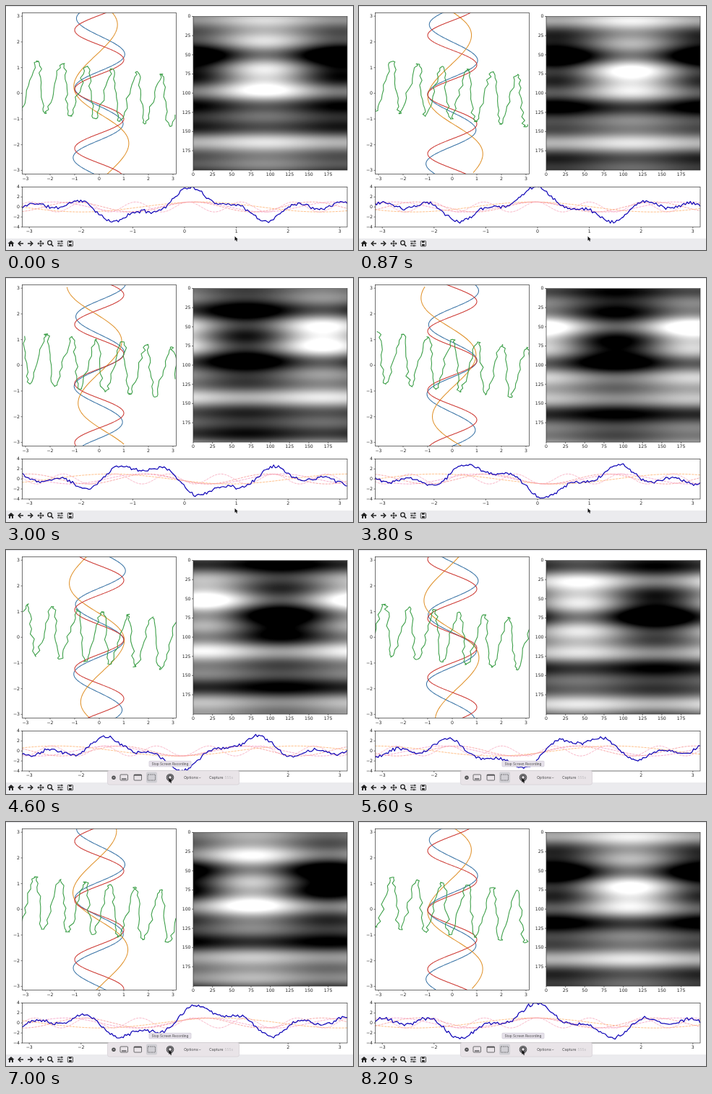
An HTML page with a canvas that plays this animation: 480x339 px, repeating every 8.27 s.

```html
<!DOCTYPE html>
<html lang="en">
<head>
<meta charset="utf-8">
<title>Rotating waves</title>
<style>
html, body { margin: 0; width: 100%; height: 100%; overflow: hidden; background: #fff; }
canvas { display: block; width: 480px; height: 339px; }
</style>
</head>
<body>
<canvas id="stage" width="480" height="339"></canvas>
<script>
const ctx = document.getElementById('stage').getContext('2d');
const LOOP = 8270, STEP = 66.68, POINTS = 200;
const FONT = '"DejaVu Sans", Verdana, sans-serif';
const UI_FONT = 'Inter, Roboto, sans-serif';

// Each plot maps data to pixels: px = ox + x * sx, py = oy - y * sy
const main = { l: 22.5, t: 9.5, r: 235.5, b: 233.5, ox: 129, oy: 121.3, sx: 34, sy: 35.7 };
const strip = { l: 22.5, t: 251.5, r: 472, b: 307, ox: 247, oy: 279.2, sx: 71.6, sy: 6.95 };
const heat = { l: 259, t: 14.5, r: 472, b: 228, ox: 259, oy: 14.5, sx: 1.066, sy: -1.066 };

const waves = [
  { k: 2.32, tilt: -0.025, color: '#3a74a6' },
  { k: 1.36, tilt: 0.1, color: '#e0922c' },
  { k: 2.73, tilt: 0, color: '#cd3a34' }
];
const FAST = 6.19;
const dashes = [[2.32, '#f59fc4'], [1.36, '#ffb473'], [2.73, '#f79a9a'], [FAST, '#f7a9bd']];

// The speed varies a little: [seconds, phase]
const pace = [[0, -0.43], [0.87, 0.13], [3, 1.94], [4.6, 3.37], [5.6, 4.28], [7, 5.34], [8.27, 6.41]];

const heatBuf = document.createElement('canvas');
heatBuf.width = heatBuf.height = 200;
const heatCtx = heatBuf.getContext('2d');
const heatImg = heatCtx.createImageData(200, 200);

function phaseAt(sec) {
  const i = Math.max(1, pace.findIndex(([t]) => t >= sec));
  const [t0, p0] = pace[i - 1], [t1, p1] = pace[i];
  return p0 + (p1 - p0) * (sec - t0) / (t1 - t0);
}

function random(seed) {
  let s = seed >>> 0;
  return () => {
    s = (s + 0x6D2B79F5) >>> 0;
    let v = Math.imul(s ^ (s >>> 15), 1 | s);
    v = (v + Math.imul(v ^ (v >>> 7), 61 | v)) ^ v;
    return ((v ^ (v >>> 14)) >>> 0) / 4294967296;
  };
}

function curve(p, at, color, width, dash = []) {
  ctx.save();
  ctx.beginPath();
  ctx.rect(p.l, p.t, p.r - p.l, p.b - p.t);
  ctx.clip();
  ctx.beginPath();
  for (let i = 0; i < POINTS; i++) {
    const u = -Math.PI + 2 * Math.PI * i / (POINTS - 1);
    const [x, y] = at(u, i);
    ctx.lineTo(p.ox + x * p.sx, p.oy - y * p.sy);
  }
  ctx.strokeStyle = color;
  ctx.lineWidth = width;
  ctx.lineJoin = 'round';
  ctx.setLineDash(dash);
  ctx.stroke();
  ctx.restore();
}

function text(str, x, y, size, align, color = '#222', font = FONT) {
  ctx.font = size + 'px ' + font;
  ctx.textAlign = align;
  ctx.textBaseline = 'middle';
  ctx.fillStyle = color;
  ctx.fillText(str, x, y);
}

function line(points, color = '#222', width = 1) {
  ctx.beginPath();
  points.forEach(([x, y]) => ctx.lineTo(x, y));
  ctx.strokeStyle = color;
  ctx.lineWidth = width;
  ctx.stroke();
}

function box(x, y, w, h, r, fill, stroke) {
  ctx.beginPath();
  ctx.roundRect(x, y, w, h, r);
  if (fill) { ctx.fillStyle = fill; ctx.fill(); }
  if (stroke) { ctx.strokeStyle = stroke; ctx.lineWidth = 0.8; ctx.stroke(); }
}

function disc(x, y, r, fill) {
  ctx.beginPath();
  ctx.arc(x, y, r, 0, 7);
  ctx.fillStyle = fill;
  ctx.fill();
}

function shape(points, fill) {
  ctx.beginPath();
  points.forEach(([x, y]) => ctx.lineTo(x, y));
  ctx.closePath();
  ctx.fillStyle = fill;
  ctx.fill();
}

function axes(p, xs, ys) {
  ctx.strokeStyle = '#333';
  ctx.lineWidth = 0.7;
  ctx.strokeRect(p.l, p.t, p.r - p.l, p.b - p.t);
  const label = v => String(v).replace('-', '\u2212');
  for (const v of xs) {
    const x = p.ox + v * p.sx;
    line([[x, p.b], [x, p.b + 2]], '#222', 0.6);
    text(label(v), x, p.b + 6.6, 6.2, 'center');
  }
  for (const v of ys) {
    const y = p.oy - v * p.sy;
    line([[p.l - 2, y], [p.l, y]], '#222', 0.6);
    text(label(v), p.l - 3.5, y + 0.3, 6.2, 'right');
  }
}

// Horizontal bands plus a vertical band that is strongest in the upper part
function drawHeat(phase) {
  const data = heatImg.data;
  const cols = Array.from({ length: 200 }, (_, c) => Math.cos((c - 106) / 31.8 - phase));
  for (let r = 0; r < 200; r++) {
    const slow = Math.cos(2 * Math.PI * (r - 83) / 77 + phase - 0.2);
    const fast = Math.cos(FAST * (r - 100) / 31.8 - phase);
    const row = 0.42 + 0.25 * slow + 0.15 * fast;
    const gain = 0.1 + 0.36 * Math.exp(-(((r - 65) / 43) ** 2));
    for (let c = 0; c < 200; c++) {
      const o = (r * 200 + c) * 4;
      data[o] = data[o + 1] = data[o + 2] = 255 * (row + gain * cols[c]);
      data[o + 3] = 255;
    }
  }
  heatCtx.putImageData(heatImg, 0, 0);
  ctx.drawImage(heatBuf, heat.l, heat.t, heat.r - heat.l, heat.b - heat.t);
}

function arrowIcon(x, y, dir) {
  line([[x - 3.5 * dir, y], [x + 3 * dir, y]], '#222', 1.5);
  line([[x, y - 3.3], [x + 3.3 * dir, y], [x, y + 3.3]], '#222', 1.5);
}

function toolbar() {
  ctx.fillStyle = '#ebebee';
  ctx.fillRect(0, 323, 480, 16);
  const y = 330;
  shape([[2.5, y], [7, y - 4], [11.5, y], [10, y], [10, y + 4], [8, y + 4],
    [8, y + 1], [6, y + 1], [6, y + 4], [4, y + 4], [4, y]], '#222');
  arrowIcon(20.5, y, -1);
  arrowIcon(33.5, y, 1);
  line([[44, y], [52, y]], '#222', 1);
  line([[48, y - 4], [48, y + 4]], '#222', 1);
  for (const [a, b] of [[1, 0], [-1, 0], [0, 1], [0, -1]]) {
    shape([[48 + a * 4.6, y + b * 4.6], [48 + a * 2.6 + b * 2, y + b * 2.6 + a * 2],
      [48 + a * 2.6 - b * 2, y + b * 2.6 - a * 2]], '#222');
  }
  ctx.beginPath();
  ctx.arc(60.5, y - 1, 2.8, 0, 7);
  ctx.lineWidth = 1.3;
  ctx.stroke();
  line([[62.5, y + 1], [65.3, y + 4]], '#222', 1.6);
  [[-3, 2], [0, -2], [3, 1]].forEach(([dy, dx]) => {
    line([[71, y + dy], [79, y + dy]], '#222', 0.9);
    line([[75 + dx, y + dy - 1.3], [75 + dx, y + dy + 1.3]], '#222', 1.3);
  });
  box(85.3, y - 3.6, 7.2, 7.4, 0.8, null, '#222');
  ctx.fillStyle = '#222';
  ctx.fillRect(87, y - 3.2, 3.6, 2);
  ctx.fillRect(87, y + 0.8, 3.8, 2.4);
}

function recorder(tip) {
  const panel = '#e9e4e8', ink = '#4a4a4c';
  box(140.5, 306.5, 182, 19.5, 2.5, panel, '#d6d1d6');
  disc(149, 316.3, 2.7, ink);
  line([[148, 315.3], [150, 317.3]], panel, 0.6);
  line([[150, 315.3], [148, 317.3]], panel, 0.6);
  box(194, 308.5, 15, 15, 2, '#d0cfd4');
  box(158, 312, 10.5, 8, 1, null, ink);
  line([[160, 318], [166.5, 318]], ink, 1.3);
  box(177, 312, 10.5, 8, 1, null, ink);
  line([[177, 312.8], [187.5, 312.8]], ink, 1.5);
  ctx.setLineDash([1.5, 1]);
  box(196, 312, 10.5, 8, 0.5, null, ink);
  ctx.setLineDash([]);
  disc(227, 316, 5.3, ink);
  disc(227, 316, 4.3, '#d0cfd4');
  disc(227, 316, 3.7, ink);
  ctx.fillStyle = panel;
  ctx.fillRect(225.4, 314.3, 3.2, 3.2);
  text('Options', 246, 316.5, 5.4, 'left', ink, UI_FONT);
  line([[267, 315.8], [268.2, 317], [269.4, 315.8]], '#666', 0.6);
  text('Capture', 281, 316.5, 5.2, 'left', ink, UI_FONT);
  text('555s', 302.5, 316.5, 5, 'left', '#bfbcc0', UI_FONT);
  if (tip) {
    box(198, 293.3, 58, 7.6, 1, '#e6e1ea', '#d2cdd8');
    text('Stop Screen Recording', 227, 297.3, 4.7, 'center', '#444', UI_FONT);
  }
}

function pointer(x, y) {
  shape([[x, y], [x, y + 6], [x + 1.4, y + 4.8], [x + 2.4, y + 7],
    [x + 3.5, y + 6.5], [x + 2.6, y + 4.4], [x + 4.3, y + 4.3]], '#111');
}

function draw(frame) {
  const ms = frame * 66.67;
  const phase = phaseAt(ms / 1000);
  const rnd = random(frame * 7919 + 11);
  const noise = Array.from({ length: POINTS }, () => rnd() + rnd() - 1);

  ctx.fillStyle = '#fff';
  ctx.fillRect(0, 0, 480, 339);
  line([[0, 0.5], [480, 0.5]], '#e4e4e8', 1);

  for (const w of waves) {
    curve(main, u => {
      const s = -Math.cos(w.k * u + phase);
      return [s - w.tilt * u, u + w.tilt * s];
    }, w.color, 1.05);
  }
  curve(main, (u, i) => {
    const s = -Math.cos(FAST * u - phase);
    return [u + 0.1 * s + 0.1 * noise[i], s - 0.1 * u];
  }, '#3c9f48', 1.1);
  const ints = [-3, -2, -1, 0, 1, 2, 3];
  axes(main, ints, ints);

  drawHeat(phase);
  const ticks = [0, 25, 50, 75, 100, 125, 150, 175];
  axes(heat, ticks, ticks);

  for (const [k, color] of dashes) {
    curve(strip, u => [u, Math.cos(k * u + phase)], color, 0.85, [3.2, 1.2]);
  }
  curve(strip, (u, i) => [
    u, dashes.reduce((sum, [k]) => sum + Math.cos(k * u + phase), 0) + noise[i] * 0.42
  ], '#1208b8', 1.25);
  axes(strip, ints, [-4, -2, 0, 2, 4]);

  toolbar();
  if (ms >= 3850) recorder(ms >= 4250);
  const m = Math.max(0, Math.min(1, (ms - 3850) / 400));
  const ease = m * m * (3 - 2 * m);
  pointer(316.5 - 91 * ease, 320 - 3 * ease);
}

let last = -1;
const start = performance.now();
function tick(now) {
  const t = Math.max(0, now - start) % LOOP;
  const frame = Math.min(123, Math.floor((t + 5) / STEP));
  if (frame !== last) draw(last = frame);
  requestAnimationFrame(tick);
}
draw(0);
requestAnimationFrame(tick);
</script>
</body>
</html>
```
